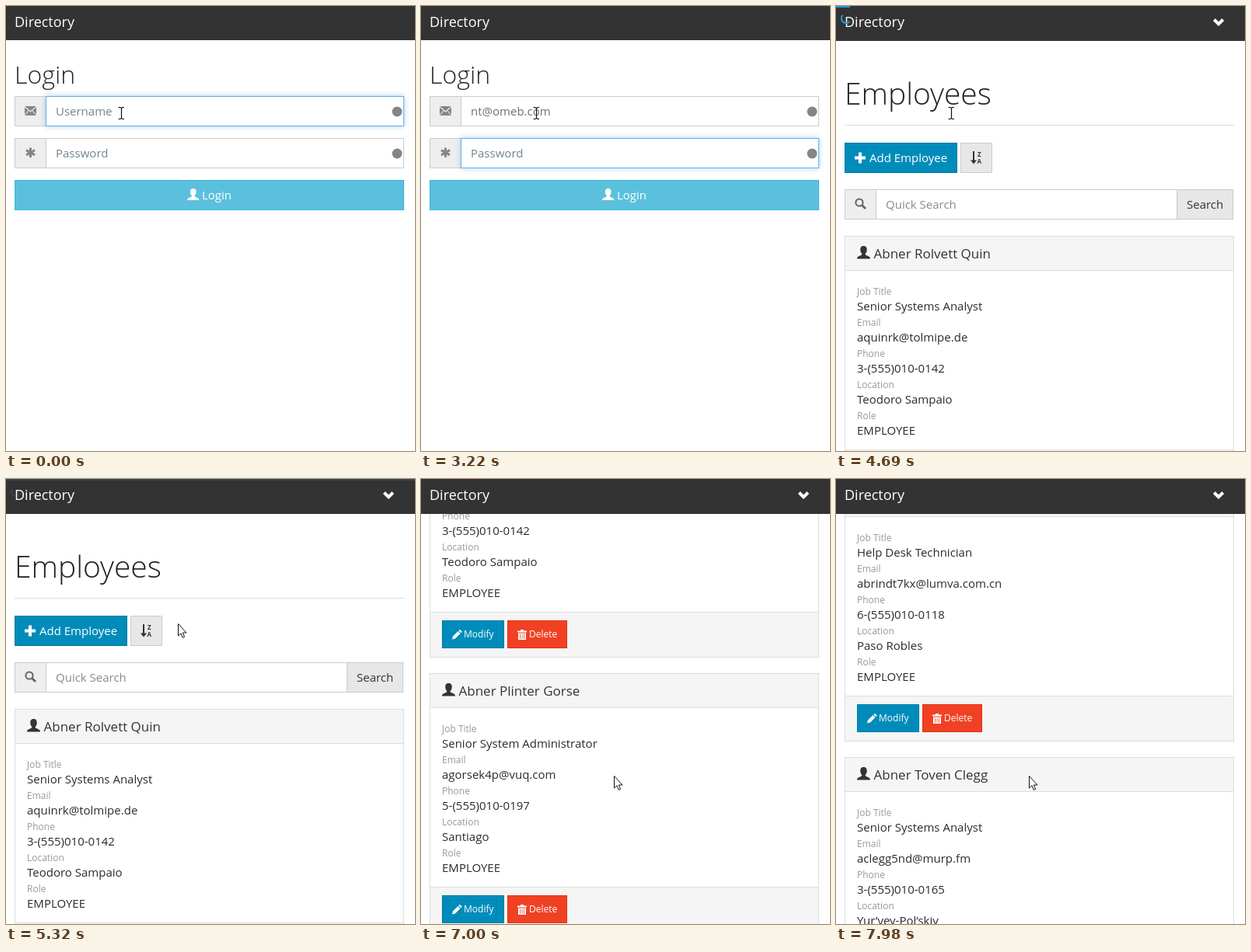
An HTML page for the animation above (8 s loop, 526 by 573 pixels).

```html
<!DOCTYPE html>
<html lang="en">
<head>
<meta charset="utf-8">
<title>Directory</title>
<style>
  html, body { margin: 0; width: 100%; height: 100%; overflow: hidden; background: #fff; }
  svg { display: block; width: 526px; height: 573px; font-family: 'Open Sans', sans-serif; }
  text { white-space: pre; }
  .light { font-weight: 300; }
  .glow { filter: blur(3.5px); }
</style>
</head>
<body>
<svg id="stage" viewBox="0 0 526 573"></svg>
<script>
const LOOP = 8000, TICK = 70;
const stage = document.getElementById('stage');

// Drawing helpers: boxes carry a 1px inner border, text sits on its baseline.
const box = (x, y, w, h, fill, stroke, extra = '') =>
  `<rect x="${x + .5}" y="${y + .5}" width="${w - 1}" height="${h - 1}" fill="${fill}" stroke="${stroke}" ${extra}/>`;
const text = (x, y, size, str, fill, extra = '') =>
  `<text x="${x}" y="${y}" font-size="${size}" fill="${fill}" ${extra}>${str}</text>`;
const line = (d, stroke, width, extra = '') =>
  `<path d="${d}" fill="none" stroke="${stroke}" stroke-width="${width}" ${extra}/>`;
const person = (x, y, size, fill) =>
  `<path transform="translate(${x} ${y}) scale(${size / 16})" fill="${fill}" d="M8 0C5 0 4 2 4 4.5C4 7 5 8.5 6 9.5C6 11 5 11.3 3 12C1 12.8 0 13.5 0 15.5H16C16 13.5 15 12.8 13 12C11 11.3 10 11 10 9.5C11 8.5 12 7 12 4.5C12 2 11 0 8 0Z"/>`;

const envelope =
  '<rect x="24" y="129" width="15" height="12" fill="#888580"/>' +
  line('M24 129.5L31.5 136L39 129.5M24 140.5L29 135M39 140.5L34 135', '#eee', 1.1);
const asterisk = line('M31.5 182.5V195M26 185.6L37 191.9M37 185.6L26 191.9', '#888580', 3);

function field(id, y, icon, hint) {
  return box(11, y, 41, 39, '#eee', '#ccc') + icon +
    `<rect class="glow" id="${id}Glow" x="51" y="${y}" width="461" height="39" fill="#66afe9"/>` +
    box(51, y, 461, 39, '#fff', '#ccc') +
    box(51, y, 461, 39, 'none', '#66afe9', `id="${id}Ring"`) +
    `<circle cx="503" cy="${y + 20}" r="6.5" fill="#888580"/>` +
    text(64, y + 25, 15, hint, '#6f8590', `id="${id}Hint"`) +
    text(64, y + 25, 15, '', '#6f6f6f', `id="${id}Text"`) +
    `<rect id="${id}Caret" y="${y + 9}" width="1" height="20" fill="#444"/>`;
}

const login =
  text(11, 100, 32, 'Login', '#222', 'class="light"') +
  field('user', 116, envelope, 'Username') +
  field('pass', 170, asterisk, 'Password') +
  box(11, 224, 501, 39, '#5bc0de', '#3db5d8') +
  person(233, 235, 15.5, '#fff') +
  text(252, 249, 15, 'Login', '#fff');

const people = [
  ['Abner Rolvett Quin', 'Senior Systems Analyst', 'aquinrk@tolmipe.de', '3-(555)010-0142', 'Teodoro Sampaio'],
  ['Abner Plinter Gorse', 'Senior System Administrator', 'agorsek4p@vuq.com', '5-(555)010-0197', 'Santiago'],
  ['Abner Snell Brindt', 'Help Desk Technician', 'abrindt7kx@lumva.com.cn', '6-(555)010-0118', 'Paso Robles'],
  ['Abner Toven Clegg', 'Senior Systems Analyst', 'aclegg5nd@murp.fm', '3-(555)010-0165', 'Yur’yev-Pol’skiy']
];
const labels = ['Job Title', 'Email', 'Phone', 'Location', 'Role'];

const pencil = '<path fill="#fff" d="M40 310.5L41 306.5L47.5 300L50.5 303L44 309.5ZM48.3 299.2L49.8 297.8L52.8 300.8L51.3 302.2Z"/>';
const trash = '<path fill="#fff" d="M124 299.5H128V298H132V299.5H136V301.5H124Z"/>' +
  '<path fill="#fff" d="M125 302.5H135V311H125Z"/>' +
  line('M127.5 303.5V310M130 303.5V310M132.5 303.5V310', '#f04124', .8);

function card([name, ...values], i) {
  const rows = [...values, 'EMPLOYEE'].map((v, k) =>
    text(27, 76 + 40 * k, 12, labels[k], '#999') +
    text(27, 96 + 40 * k, 15, v, '#2b2b2b')).join('');
  return `<g transform="translate(0 ${296 + 354 * i})">` +
    box(11, 0, 501, 334, '#fff', '#ddd') +
    box(11, 0, 501, 45, '#f5f5f5', '#ddd') +
    box(11, 275, 501, 59, '#f5f5f5', '#ddd') +
    person(27, 13, 17, '#333') + text(48.5, 29, 17, name, '#333') + rows +
    box(27, 286, 80, 36, '#008cba', '#0079a1') + pencil + text(55, 308, 12, 'Modify', '#fff') +
    box(111, 286, 77, 36, '#f04124', '#ea2f10') + trash + text(139, 308, 12, 'Delete', '#fff') +
    '</g>';
}

const employees =
  text(11, 127, 39, 'Employees', '#222', 'class="light"') +
  line('M11 153.5H512', '#ddd', 1) +
  box(11, 176, 145, 39, '#008cba', '#0079a1', 'id="add"') +
  line('M31 188.5V202.5M24 195.5H38', '#fff', 4) +
  text(43, 201, 15, 'Add Employee', '#fff') +
  box(160, 176, 41, 39, '#e7e7e7', '#cbcbcb', 'id="sort"') +
  line('M177 187V202', '#333', 2) + '<path d="M173 198.5H181L177 203.5Z" fill="#333"/>' +
  text(182, 194, 8, 'Z', '#333', 'font-weight="700"') +
  text(181.5, 202.5, 8, 'A', '#333', 'font-weight="700"') +
  box(11, 236, 41, 39, '#eee', '#ccc') +
  '<circle cx="30" cy="253" r="4.6" fill="none" stroke="#666" stroke-width="2"/>' +
  line('M33.5 256.5L38 261', '#666', 2.8) +
  box(51, 236, 388, 39, '#fff', '#ccc') +
  text(64, 261, 15, 'Quick Search', '#8a8a8a') +
  box(438, 236, 73, 39, '#e7e7e7', '#cbcbcb') +
  text(451, 261, 15, 'Search', '#333') +
  people.map(card).join('');

stage.innerHTML =
  '<rect width="526" height="573" fill="#fff"/>' +
  `<g id="login">${login}</g><g id="employees">${employees}</g>` +
  '<rect id="nav" width="526" height="45" fill="#333"/>' +
  text(11, 27, 18, 'Directory', '#fff') +
  line('M486.3 17.5L492 23.2L497.7 17.5', '#fff', 4, 'id="chevron"') +
  '<g id="loader"><rect id="bar" height="2" fill="#2299dd"/>' +
  line('M8.75 20.25A6 6 0 0 1 17.25 11.75', '#2299dd', 2, 'id="spinner"') + '</g>' +
  '<g id="cursor">' +
  line('M-3.5 -7.5H-1L.5 -6.5L2 -7.5H4M.5 -6.5V6.5M-3.5 7.5H-1L.5 6.5L2 7.5H4', '#111', 1.2, 'id="beam"') +
  '<path id="arrow" fill="#fff" stroke="#111" d="M.5 .5V16L4 12.8L6.3 18.3L8.6 17.3L6.3 12H11Z"/>' +
  '<path id="hand" fill="#fff" stroke="#111" d="M-2 1.5a2 2 0 0 1 4 0V8.5q2.5-.8 3.2.8q2.4-.5 2.8 1q2-.2 2 1.6V16q0 2-1.5 4V22.5H-1.5V20.5L-5.5 14.5q-1.5-3 .5-3.2Q-3.5 11.3-2 13.5Z"/></g>';

const el = {};
stage.querySelectorAll('[id]').forEach(n => el[n.id] = n);
const show = (node, on) => node.setAttribute('visibility', on ? 'inherit' : 'hidden');
const clamp = v => Math.max(0, Math.min(1, v));

// Steps: [time, characters typed, caret visible]
const userSteps = [[0, 0, 0], [280, 1, 1], [490, 2, 1], [910, 2, 0], [1190, 3, 1], [1680, 4, 1], [1820, 6, 1],
  [1960, 7, 1], [2100, 8, 1], [2240, 9, 1], [2310, 10, 1], [2380, 11, 1], [2590, 11, 0]];
const passSteps = [[0, 0, 0], [2590, 0, 1], [3220, 0, 0], [3290, 1, 1], [3360, 2, 1], [3430, 3, 1],
  [3570, 4, 1], [3640, 5, 1], [3710, 6, 1], [3780, 7, 1]];
const scrollTimes = [6510, 7000, 7420, 7490, 7980];
const path = [[4900, 148, 138], [5390, 233, 194], [5460, 233, 194], [5740, 152, 216],
  [5950, 104, 202], [6090, 104, 202], [6370, 248, 382]];
const PAGE_SWITCH = 4480, LOAD_START = 4130, LOAD_DONE = 4900;

function type(id, value, steps, focus, t) {
  const [, count, caret] = steps.filter(s => s[0] <= t).pop();
  const out = el[id + 'Text'];
  out.textContent = value.slice(0, count);
  show(el[id + 'Hint'], !count);
  show(el[id + 'Caret'], caret);
  el[id + 'Caret'].setAttribute('x', Math.floor(64 + (count ? out.getComputedTextLength() : 0)));
  el[id + 'Ring'].setAttribute('opacity', focus);
  el[id + 'Glow'].setAttribute('opacity', .6 * focus);
}

function pointer(t) {
  const i = path.findIndex(p => p[0] > t);
  if (i < 0) return path[path.length - 1].slice(1);
  if (i === 0) return path[0].slice(1);
  const [t0, x0, y0] = path[i - 1], [t1, x1, y1] = path[i];
  const k = (t - t0) / (t1 - t0);
  return [Math.round(x0 + (x1 - x0) * k), Math.round(y0 + (y1 - y0) * k)];
}

function hover(node, over, on, off) {
  node.setAttribute('fill', over ? on[0] : off[0]);
  node.setAttribute('stroke', over ? on[1] : off[1]);
}

function load(t) {
  const done = clamp((t - LOAD_DONE) / 350);
  const fade = clamp((t - LOAD_START + 20) / 350) * (1 - clamp((t - LOAD_DONE - 140) / 350));
  const crawl = 18 * clamp((t - LOAD_START - 70) / 490);
  el.loader.setAttribute('opacity', t < LOAD_START ? 0 : fade);
  el.bar.setAttribute('width', crawl + (526 - crawl) * done);
  el.spinner.setAttribute('transform', `rotate(${270 + (t - 4690) * 540 / 490} 13 16)`);
}

function draw(t) {
  const inside = t >= PAGE_SWITCH;
  show(el.login, !inside);
  show(el.employees, inside);
  show(el.chevron, inside);
  el.nav.setAttribute('height', inside ? 45 : 44);

  const shift = clamp((t - 2520) / 210);
  type('user', 'nt@omeb.com', userSteps, 1 - shift, t);
  type('pass', '•'.repeat(7), passSteps, shift, t);
  // Carets inherit visibility from their page group.
  load(t);

  const scroll = 200 * scrollTimes.filter(s => s <= t).length;
  el.employees.setAttribute('transform', `translate(0 ${-scroll})`);

  const [x, y] = pointer(t);
  const inRow = inside && y >= 176 && y < 215;
  const overAdd = inRow && x >= 11 && x < 156;
  const overSort = inRow && x >= 160 && x < 201;
  hover(el.add, overAdd, ['#006687', '#004b63'], ['#008cba', '#0079a1']);
  hover(el.sort, overSort, ['#cecece', '#acacac'], ['#e7e7e7', '#cbcbcb']);
  const hand = overAdd || overSort, beam = t <= LOAD_DONE;
  show(el.beam, beam);
  show(el.hand, hand);
  show(el.arrow, !hand && !beam);
  el.cursor.setAttribute('transform', `translate(${x} ${y})`);
}

const start = performance.now();
function frame() {
  const t = (performance.now() - start) % LOOP;
  draw(Math.floor(t / TICK) * TICK);
  requestAnimationFrame(frame);
}
frame();
</script>
</body>
</html>
```
